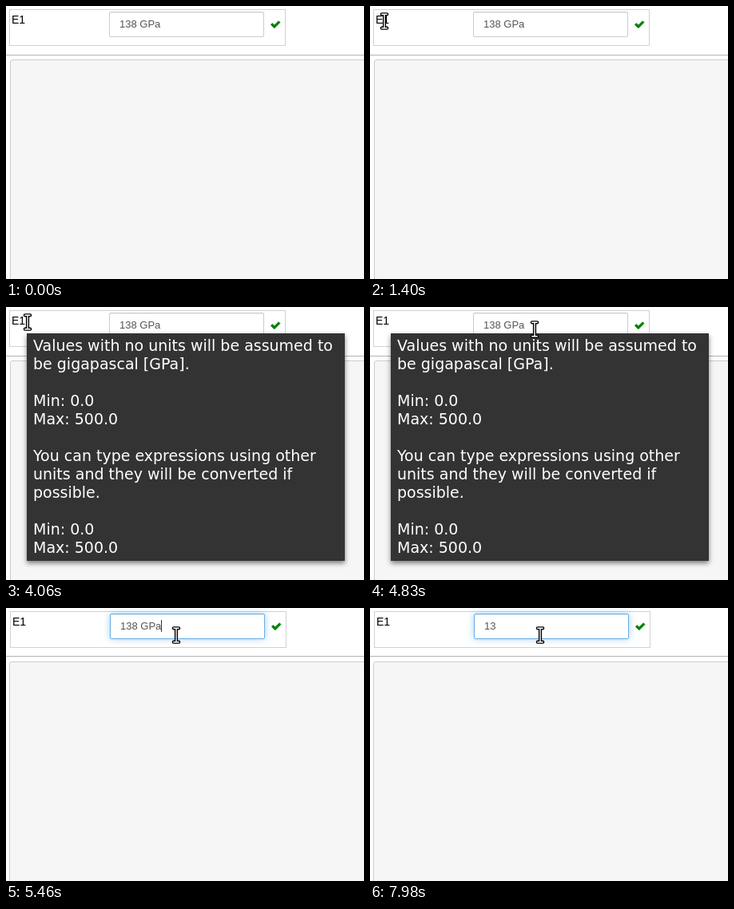
An HTML page for the animation above (8000 ms loop, 448 by 342 pixels).

```html
<!DOCTYPE html>
<html lang="en">
<head>
<meta charset="utf-8">
<title>Unit input</title>
<style>
  html, body { margin: 0; width: 100%; height: 100%; overflow: hidden; background: #fff; }
  div, svg { position: absolute; box-sizing: border-box; }
  #stage { left: 0; top: 0; width: 448px; height: 342px; overflow: hidden; font-family: "Liberation Sans", Arial, sans-serif; }
  #row { left: 4px; top: 4px; width: 346px; height: 46px; border: 1px solid #ced3ce; }
  #label { left: 2px; top: 2px; font-size: 14px; line-height: 20px; color: #000; }
  #field { left: 124px; top: 2px; width: 194px; height: 32px; padding-left: 12px; border: 1px solid; border-radius: 2px;
    background: #fff; font-size: 13px; line-height: 30px; color: #555; white-space: pre; }
  #caret { display: inline-block; width: 1px; height: 15px; margin-right: -1px; vertical-align: -3px; background: #333; }
  #line { left: 0; width: 448px; height: 1px; background: #aeb6ae; }
  #panel { top: 67px; width: 460px; height: 300px; border: 1px solid #ccc; border-radius: 3px; background: #f6f6f6; }
  #tip { left: 26px; top: 33px; width: 398px; height: 285px; padding: 4px 8px; background: #333; color: #fff;
    font: 19px/23px "DejaVu Sans", sans-serif; white-space: pre; box-shadow: 0 3px 6px rgba(0,0,0,.5); }
  svg { left: 0; top: 0; }
</style>
</head>
<body>
<div id="stage">
  <div id="row">
    <div id="label">E1</div>
    <div id="field"><span id="value"></span><span id="caret"></span></div>
  </div>
  <div id="line"></div>
  <div id="panel"></div>
  <div id="tip">Values with no units will be assumed to
be gigapascal [GPa].

Min: 0.0
Max: 500.0

You can type expressions using other
units and they will be converted if
possible.

Min: 0.0
Max: 500.0</div>
  <svg width="448" height="342">
    <path id="check" d="M331.4 23.4l1.9-1.9 2.5 2.5 5.3-5.3 1.9 1.9-7.2 7.2z" fill="#008000" stroke="#008000" stroke-width=".8" stroke-linejoin="round"/>
    <path id="cross" d="M295 19l8 8m0-8l-8 8" stroke="#c00" stroke-width="2.8"/>
    <g id="cursor">
      <g id="beam" fill="none" stroke-linecap="round">
        <path d="M-3.2-8.7H3.2M0-8.7V8.7M-3.2 8.7H3.2" stroke="#000" stroke-width="4.2"/>
        <path d="M-3.2-8.7H3.2M0-8.7V8.7M-3.2 8.7H3.2" stroke="#fff" stroke-width="1.4"/>
      </g>
      <path id="arrow" d="M0 0V19L4.5 15 7.5 22 10.8 20.6 7.8 14H14Z" transform="scale(1.12)" fill="#fff" stroke="#000" stroke-width="1.4" stroke-linejoin="round"/>
    </g>
  </svg>
</div>
<script>
const LOOP = 8000, STEP = 70;
const $ = id => document.getElementById(id);
const show = (id, on) => $(id).style.visibility = on ? "visible" : "hidden";

// pointer stops: time, x, y
const path = [
  [420, 114, 1], [980, 34, 21], [1120, 34, 21], [1400, 18, 19],
  [3990, 18, 19], [4060, 27, 19], [4130, 45, 13], [4270, 90, 7], [4340, 116, 9],
  [4410, 145, 17], [4550, 193, 22], [4620, 193, 22], [4830, 206, 28], [4900, 213, 34]
];
// field contents: time, text
const edits = [[0, "138 GPa"], [6230, "138 GP"], [6580, "138 "], [6790, "138"], [7980, "13"]];

function pointer(t) {
  const i = path.findIndex(p => p[0] > t);
  if (i < 0) return path[path.length - 1].slice(1);
  if (i === 0) return path[0].slice(1);
  const [a, b] = [path[i - 1], path[i]];
  const k = (t - a[0]) / (b[0] - a[0]);
  return [a[1] + (b[1] - a[1]) * k, a[2] + (b[2] - a[2]) * k];
}

function draw(now) {
  const t = Math.floor(now % LOOP / STEP) * STEP;
  const shift = t >= 5040 ? 1 : 0;
  const invalid = t >= 6370 && t < 6790;
  const focus = Math.max(0, Math.min(1, (t - 4970) / 490));
  const glow = 1 - (1 - focus) ** 2;
  const mix = (a, b) => Math.round(a + (b - a) * glow);

  $("row").style.left = 4 + shift + "px";
  $("line").style.top = 61 - shift + "px";
  $("panel").style.left = 5 - shift + "px";

  const field = $("field").style;
  field.left = (invalid ? 86 : 124) + "px";
  field.borderColor = `rgb(${mix(204, 102)},${mix(204, 175)},${mix(204, 233)})`;
  field.boxShadow = `inset 0 1px 1px rgba(0,0,0,.075), 0 0 8px rgba(102,175,233,${.6 * glow})`;
  $("value").textContent = edits.filter(e => e[0] <= t).pop()[1];
  show("caret", t >= 5040 && t < 7980);

  $("check").setAttribute("transform", `translate(${shift})`);
  show("check", !invalid);
  show("cross", invalid);
  show("tip", t >= 1960 && t < 4900);

  const [x, y] = pointer(t);
  const overText = x < 30 || x >= 129;
  $("cursor").setAttribute("transform", `translate(${Math.round(x)} ${Math.round(y)})`);
  show("beam", t >= 420 && overText);
  show("arrow", t >= 420 && !overText);
}

const start = performance.now();
function tick() {
  draw(performance.now() - start);
  requestAnimationFrame(tick);
}
tick();
</script>
</body>
</html>
```
